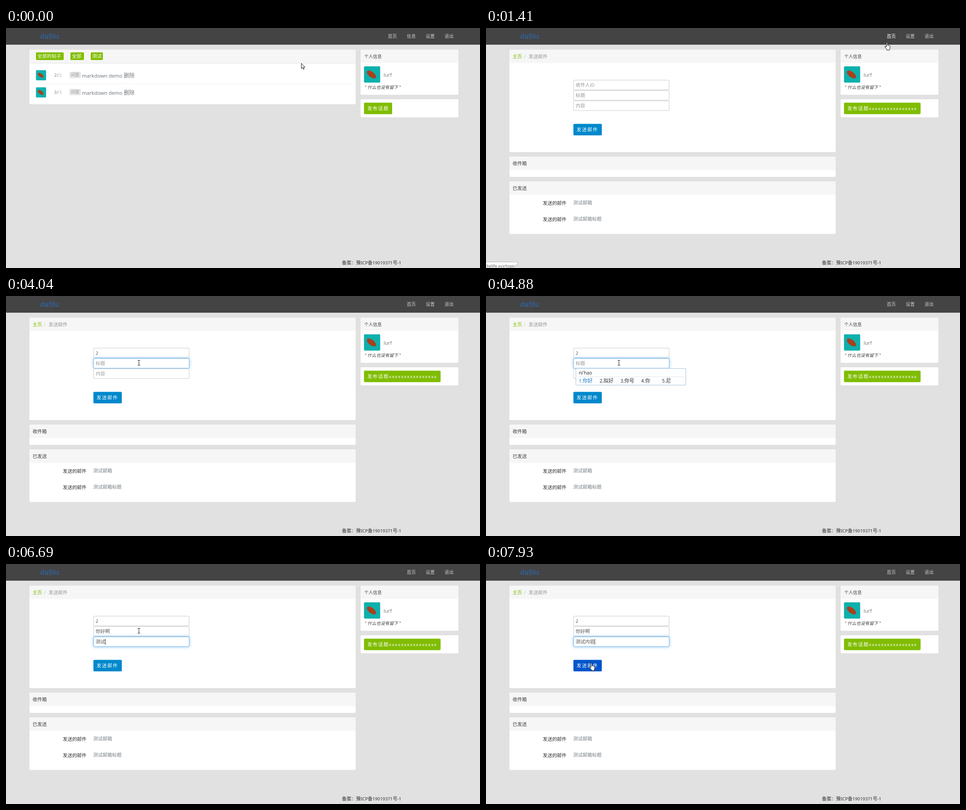
An HTML page with a canvas that plays this animation: 1052 by 532 pixels, repeating every 8000 ms.

```html
<!DOCTYPE html>
<html lang="zh-CN">
<head>
<meta charset="utf-8">
<title>发送邮件</title>
<style>
html, body { margin: 0; width: 100%; height: 100%; overflow: hidden; background: #e1e1e1; }
canvas { display: block; }
</style>
</head>
<body>
<canvas id="stage" width="1052" height="532"></canvas>
<script>
const ctx = document.getElementById('stage').getContext('2d');
const LOOP = 8000;
const LATIN = '"Noto Sans", "Open Sans", sans-serif';
const CJK = '"Noto Sans CJK SC", "Noto Sans CJK JP", "Noto Sans CJK", sans-serif';
const GREEN = '#80bd01', GRAY = '#778087', DARK = '#3c3c3c';

const HAND = new Path2D('M3.5 1.5Q3.5 .3 4.7 .3T5.9 1.5V6.3Q7 5.6 8 6.6Q9.2 6 10 7.2Q11.7 6.8 11.8 8.8V11.5Q11.8 13 10.6 14.8V17H4.6V15.2Q2.8 13 .6 10Q.2 8.4 1.8 8.6L3.5 10.2Z');
const ARROW = new Path2D('M.5 .5V12L3.2 9.6L5 13.6L6.9 12.8L5.1 8.9H8.6Z');
const BEAM = new Path2D('M-2.5 -5.5H-.5L0 -5L.5 -5.5H2.5M0 -5V5M-2.5 5.5H-.5L0 5L.5 5.5H2.5');

// Each step changes only the listed parts of the state.
const steps = [
  [0, { page: 'topics', cur: 'arrow', x: 655, y: 78, hover: -1, status: '', vals: ['', '', ''], focus: -1, caret: false, ime: null, hot: false }],
  [200, { x: 792, y: 50 }],
  [400, { cur: 'hand', x: 889, y: 23, hover: 1, status: 'belife.xyz/mail' }],
  [600, { x: 891, y: 20 }],
  [1000, { x: 890, y: 21 }],
  [1190, { x: 890, y: 21.5 }],
  [1410, { page: 'mail', x: 885, y: 32, hover: 0, status: 'belife.xyz/topic/' }],
  [1610, { cur: 'arrow', x: 742, y: 84, hover: -1, status: '' }],
  [1820, { x: 430, y: 122 }],
  [2030, { cur: 'beam', x: 295, y: 126 }],
  [2240, { focus: 0, caret: true }],
  [2630, { caret: false }],
  [3020, { vals: ['2', '', ''], caret: true }],
  [3220, { y: 137 }],
  [3440, { y: 148 }],
  [3650, { focus: 1, caret: true }],
  [4040, { caret: false }],
  [4460, { ime: ['n', '1.你 2.那 3.年 4.能 5.内', 210] }],
  [4660, { ime: ["ni'h", '1.你好 2.你会 3.你还 4.你和 5.拟合', 267] }],
  [4870, { ime: ["ni'hao", '1.你好 2.拟好 3.你号 4.你 5.尼', 245] }],
  [5070, { ime: ["ni'hao'a", '1.你好啊 2.你好 3.拟好 4.你号 5.你', 326] }],
  [5270, { ime: null, vals: ['2', '你好啊', ''], caret: true }],
  [5690, { focus: 2, caret: true }],
  [6080, { caret: false, ime: ['c', '1.从 2.才 3.次 4.错 5.车', 210] }],
  [6280, { ime: ["ce's", '1.测试 2.测算 3.厕所 4.策 5.测', 245] }],
  [6490, { ime: ["ce'shi", '1.测试 2.侧视 3.测时 4.策士 5.测', 266] }],
  [6690, { ime: null, vals: ['2', '你好啊', '测试'], caret: true }],
  [6890, { caret: false, ime: ["nei'r", '1.内容 2.内 3.那 4.哪 5.馁', 209] }],
  [7100, { ime: ["nei'rong", '1.内容 2.内 3.那 4.哪 5.馁', 209] }],
  [7320, { ime: null, vals: ['2', '你好啊', '测试内容'], caret: true }],
  [7520, { cur: 'arrow', x: 282, y: 176 }],
  [7730, { cur: 'hand', x: 234, y: 212, hot: true }],
  [7930, { x: 229.5, y: 219.5 }]
];

function stateAt(t) {
  const s = {};
  for (const [at, patch] of steps) if (at <= t) Object.assign(s, patch);
  return s;
}

function box(x, y, w, h, fill, r = 0) {
  ctx.beginPath();
  ctx.roundRect(x, y, w, h, r);
  ctx.fillStyle = fill;
  ctx.fill();
}

// Draws mixed text centred on cy and returns its right edge.
function text(str, x, cy, size, color, { gap = 0, style = '' } = {}) {
  ctx.fillStyle = color;
  ctx.letterSpacing = gap + 'px';
  for (const run of str.match(/[\x20-\x7e]+|[^\x20-\x7e]+/g) || []) {
    const latin = run.charCodeAt(0) < 127;
    ctx.font = `${style} ${latin ? size * 0.933 : size}px ${latin ? LATIN : CJK}`;
    ctx.fillText(run, x, cy + size * 0.38);
    x += ctx.measureText(run).width;
  }
  ctx.letterSpacing = '0px';
  return x;
}

function panel(x, y, w, h, head) {
  box(x, y, w, h, '#fff', 2);
  if (head) box(x, y, w, head, '#f6f6f6', [2, 2, 0, 0]);
}

function avatar(x, y, s) {
  box(x, y, s, s, '#0db0ad', 2);
  ctx.beginPath();
  ctx.ellipse(x + s * 0.46, y + s * 0.5, s * 0.33, s * 0.17, 0.65, 0, 7);
  ctx.fillStyle = '#a8401c';
  ctx.fill();
}

function nav(labels, x, hover) {
  labels.forEach((label, i) => text(label, x + i * 42, 18, 9.9, i === hover ? '#fff' : '#ccc'));
}

function sidebar(button, w) {
  panel(787, 48, 217, 100, 29);
  text('个人信息', 795, 63, 9.75, '#444');
  avatar(794.5, 85, 36);
  text('lurf', 838, 103, 12, GRAY);
  text('" 什么也没有留下 "', 796, 131, 9.75, DARK, { style: 'italic' });
  panel(787, 158, 217, 40);
  box(794.5, 165.5, w, 25.5, GREEN, 2);
  text(button, 802, 178, 10.5, '#fff', { gap: 1.5 });
}

function topics() {
  panel(52, 48, 724, 121, 30);
  box(52, 77.5, 724, 1, '#e3e3e3');
  [['全部的帖子', 66.5, 61.5], ['全部', 143, 30], ['测试', 188, 27]].forEach(([label, x, w]) => {
    box(x, 54, w, 17, GREEN, 2);
    text(label, x + 3.3, 62.5, 10.5, '#fff');
  });
  box(59, 123, 710, 1, '#f0f0f0');
  ['2', '3'].forEach((n, i) => {
    const cy = 104.5 + i * 38;
    avatar(66.5, cy - 11, 22.5);
    text(n, 107, cy, 10.5, '#7d7d91');
    text('/', 113.3, cy, 10.5, '#777');
    text(n, 118, cy, 10, '#b4b4b4');
    box(141, cy - 7.5, 25, 14, '#e5e5e5', 2);
    text('问答', 144.5, cy - 0.5, 9, '#999');
    text('markdown demo 删除', 168.5, cy + 0.5, 12, '#737a80');
  });
}

function field(i, s) {
  const y = 115 + i * 23, on = s.focus === i, val = s.vals[i];
  if (on) {
    ctx.shadowColor = 'rgba(82,168,236,.7)';
    ctx.shadowBlur = 6;
  }
  box(194, y, 213, 22.5, on ? '#75b9f0' : '#ccc', 3);
  ctx.shadowBlur = 0;
  box(195, y + 1, 211, 20.5, '#fff', 2);
  const cy = y + 11.3;
  const end = val ? text(val, 199, cy, 10.5, '#555') : 199;
  if (!val) text(['收件人ID', '标题', '内容'][i], 199, cy, 10.5, '#999');
  if (on && s.caret) box(Math.round(end), y + 5, 1, 13, '#333');
  return end;
}

function imePopup([pinyin, list, w], x, y) {
  box(x, y, w, 38, '#a9c3d9', 2);
  box(x + 1, y + 1, w - 2, 36, '#fdfeff', 1);
  box(x + 5, y + 18.5, w - 10, 1, '#dde7ee');
  text(pinyin, x + 7, y + 10, 11, '#333');
  const words = list.split(' '), pitch = (w - 14) / words.length;
  words.forEach((word, i) => text(word, x + 7 + i * pitch, y + 28, 11, i ? '#333' : '#1a74c4'));
}

function mail(s) {
  panel(52, 48, 724, 227, 29.5);
  text('主页', 59, 63, 10.5, GREEN);
  text('/', 84, 63, 10.5, '#bbb');
  text('发送邮件', 94.5, 63, 10.5, '#999');
  const ends = [0, 1, 2].map(i => field(i, s));
  box(194, 212.5, 63, 25.5, s.hot ? '#0055cc' : '#0088cc', 2);
  text('发送邮件', 201, 225.5, 10.5, '#fff', { gap: 1.5 });

  panel(52, 285, 724, 45, 30);
  text('收件箱', 59, 300, 10.5, DARK);
  panel(52, 340, 724, 116.5, 30);
  text('已发送', 59, 355, 10.5, DARK);
  ['测试邮箱', '测试邮箱标题'].forEach((title, i) => {
    text('发送的邮件', 126, 388.5 + i * 36, 10.5, '#333');
    text(title, 193.5, 387.5 + i * 36, 10.5, GRAY);
  });
  if (s.ime) imePopup(s.ime, Math.round(ends[s.focus]), 137 + s.focus * 23);
}

function statusBar(str) {
  ctx.font = `9.1px ${LATIN}`;
  const w = ctx.measureText(str).width + 3;
  box(-2, 518, w + 2, 16, '#b8b8b8', [0, 3, 0, 0]);
  box(-2, 519, w + 1, 15, '#fafafa', [0, 2, 0, 0]);
  text(str, 1, 527, 9.75, '#666');
}

function cursor({ cur, x, y }) {
  ctx.save();
  ctx.translate(x, y);
  ctx.lineWidth = 1;
  ctx.strokeStyle = '#111';
  if (cur === 'beam') {
    ctx.stroke(BEAM);
  } else {
    const shape = cur === 'hand' ? HAND : ARROW;
    ctx.fillStyle = '#fff';
    ctx.fill(shape);
    ctx.stroke(shape);
  }
  ctx.restore();
}

function draw(t) {
  const s = stateAt(t), onMail = s.page === 'mail';
  box(0, 0, 1052, 532, '#e1e1e1');
  box(0, 0, 1052, 37, '#444');
  ctx.font = 'bold 15.75px "Liberation Sans", Arial, sans-serif';
  ctx.fillStyle = '#335f91';
  ctx.fillText('dafilu', 76, 24);
  if (onMail) {
    nav(['首页', '设置', '退出'], 889.5, s.hover);
    mail(s);
    sidebar('发布话题' + 'x'.repeat(16), 170);
  } else {
    nav(['首页', '信息', '设置', '退出'], 847.5, s.hover);
    topics();
    sidebar('发布话题', 62.5);
  }
  text('备案：豫ICP备19019371号-1', 745.5, 520, 10.5, '#333');
  if (s.status) statusBar(s.status);
  cursor(s);
}

const start = performance.now();
function tick() {
  draw((performance.now() - start) % LOOP);
  requestAnimationFrame(tick);
}
tick();
</script>
</body>
</html>
```
